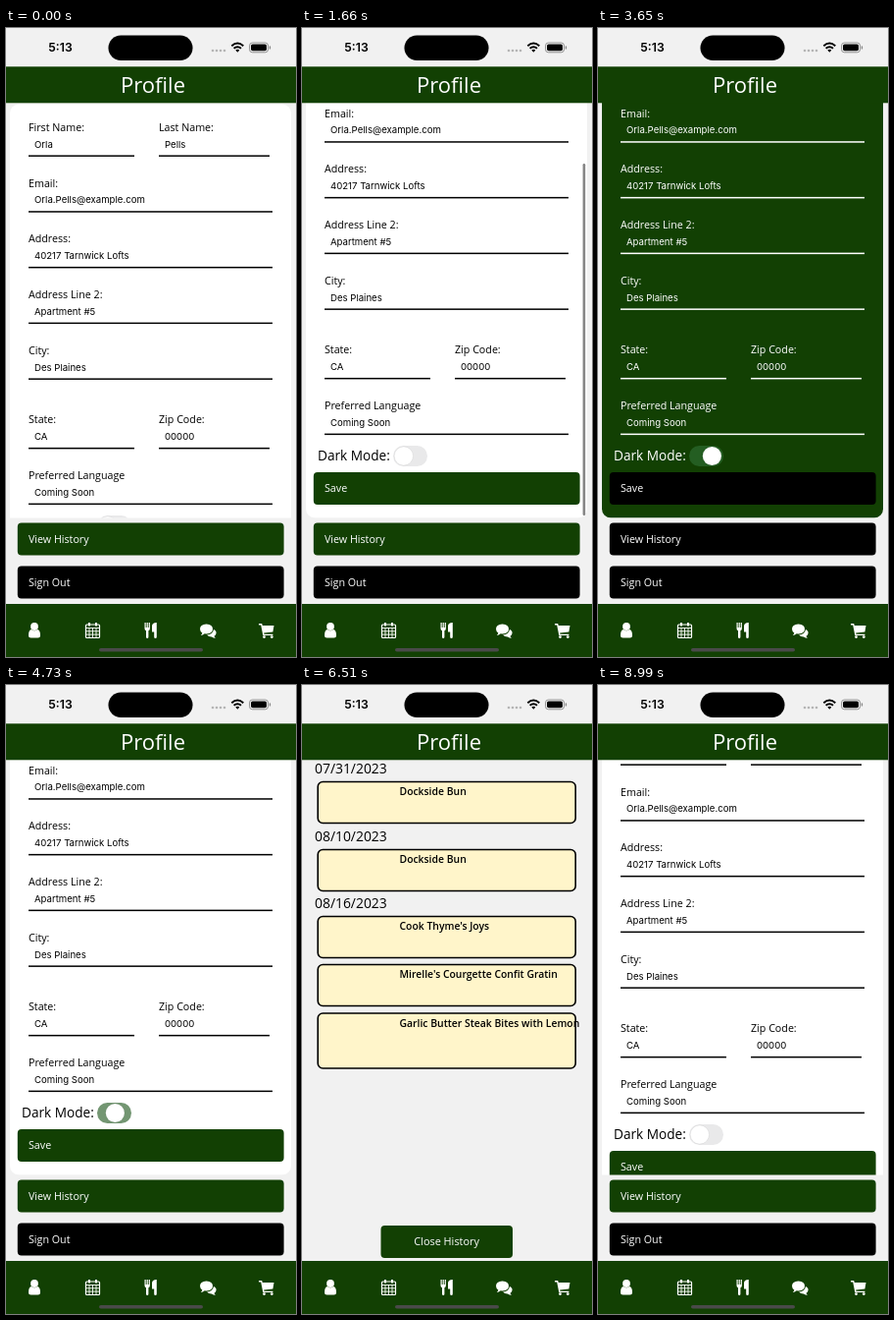
Animation, 296 px wide and 640 px high, one loop 9.76 s. Source, as an HTML page:

```html
<!DOCTYPE html>
<html lang="en">
<head>
<meta charset="utf-8">
<title>Profile</title>
<style>
  html, body { margin: 0; width: 100%; height: 100%; overflow: hidden; background: #f1f1f1; }
  svg { display: block; --card: #fff; --ink: #000; --btn: #124003; }
  svg.dark { --card: #124003; --ink: #fff; --btn: #000; }
  text { font-family: "Open Sans", sans-serif; }
  .val { font-family: Inter, sans-serif; }
  .ink { fill: var(--ink); }
  .card { fill: var(--card); }
  .btn { fill: var(--btn); }
  .green { fill: #124003; }
</style>
</head>
<body>
<script>
const LOOP = 9760;

const text = (x, y, s, size = 10.7, attr = 'class="ink"') =>
  `<text x="${x}" y="${y + size * 0.35}" font-size="${size}" ${attr}>${s}</text>`;
const rect = (x, y, w, h, r, attr) =>
  `<rect x="${x}" y="${y}" width="${w}" height="${h}" rx="${r}" ${attr}/>`;
const dot = (x, y, rx, fill, ry = rx) =>
  `<ellipse cx="${x}" cy="${y}" rx="${rx}" ry="${ry}" fill="${fill}"/>`;
const button = (y, label, attr = 'class="btn"') =>
  rect(11.8, y, 271.8, 33, 4, attr) + text(23, y + 16.5, label, 10.7, 'fill="#fff"');
const field = (x, y, w, label, value) =>
  text(x, y, label) + text(x + 6, y + 17.3, value, 9.6, 'class="ink val"') +
  rect(x, y + 28.4, w, 1.5, 0, 'class="ink"');

// Seeded scatter of small food pieces
function scatter(n, seed, cx, cy, rx, ry, size, colors) {
  const rnd = () => (seed = (seed * 16807) % 2147483647) / 2147483647;
  let out = '';
  for (let i = 0; i < n; i++) {
    const a = rnd() * 6.283, d = Math.sqrt(rnd());
    out += dot(cx + Math.cos(a) * d * rx, cy + Math.sin(a) * d * ry,
      size * (0.7 + rnd() * 0.6), colors[i % colors.length], size * 0.75);
  }
  return out;
}

function burger() {
  let rays = '';
  for (let i = 0; i < 12; i++) {
    rays += `<path d="M32 15L80 8V18Z" fill="#8fd0ea" opacity=".3" transform="rotate(${i * 30} 32 15)"/>`;
  }
  return rect(0, 0, 66, 30, 0, 'fill="url(#sky)"') + rays +
    rect(23, 21, 19, 5.5, 2.5, 'fill="#b9793a"') +
    rect(22.5, 17.5, 20, 4.5, 2, 'fill="#4a2a14"') +
    rect(22, 16, 21, 1.8, 0.9, 'fill="#d9a93c"') +
    rect(22, 14, 21, 2.2, 1, 'fill="#64803a"') +
    rect(24, 12.8, 17, 1.5, 0.7, 'fill="#a8432c"') +
    '<path d="M22.5 13Q23 4.500 32.500 4.500T42.500 13Z" fill="#b87d42"/>' +
    scatter(7, 5, 32, 8.5, 6, 2.5, 0.5, ['#ecd0a0']);
}

const bake = () => rect(0, 0, 66, 31, 0, 'fill="#d2cec8"') +
  dot(6, 5, 13, '#6d6a52', 8) + dot(60, 28, 10, '#a9a298', 6) +
  '<g transform="rotate(12 35 15)">' +
  dot(35, 15, 28, '#f4f1ec', 14.5) + dot(35, 14, 24, '#a33a1a', 11.5) +
  scatter(85, 11, 35, 14, 23, 11, 1.6, ['#c8381d', '#5f8c2b', '#e07f2a', '#9c2717', '#4b7424', '#e6b04a']) +
  '</g>';

function feast() {
  let out = rect(0, 0, 66, 30, 0, 'fill="#3d332c"');
  const plates = [[9, 7, 8, '#b8752f'], [30, 5, 8, '#7d8f3a'], [52, 8, 9, '#c9a05a'],
    [18, 21, 9, '#a84b28'], [40, 19, 9, '#c48a3c'], [60, 24, 8, '#8b4b2a']];
  plates.forEach(([x, y, r, c], i) => {
    out += dot(x, y, r, i % 2 ? '#d9d2c4' : '#7b8a8c') + dot(x, y, r - 1.8, c) +
      scatter(18, 21 + i, x, y, r - 2, r - 2, 1, ['#e0bd62', '#59702e', '#a5351f', '#4a3020']);
  });
  return out;
}

const steak = () => rect(0, 0, 66, 43, 0, 'fill="#cfcfcd"') +
  '<path d="M0 16L50 5L66 27L10 43Z" fill="#efefed"/>' +
  dot(38, 27, 26, '#e0deda', 14) + dot(14, 14, 6, '#7d9158', 3) +
  scatter(32, 7, 38, 26, 21, 9, 4.2, ['#4c3429', '#69493a', '#3d2a21', '#7b5a47']) +
  scatter(18, 9, 38, 25, 19, 8, 0.7, ['#8b9b58', '#a98468']);

const meals = [
  [98, 43, 'Dockside Bun', 30, burger],
  [167, 43, 'Dockside Bun', 30, burger],
  [235, 43, "Cook Thyme's Joys", 31, bake],
  [284, 43, "Mirelle's Courgette Confit Gratin", 30, feast],
  [333.5, 57, 'Garlic Butter Steak Bites with Lemon', 43, steak],
];

const history = meals.map(([y, h, name]) =>
    rect(16.2, y + 0.5, 263, h - 1, 5, 'fill="#fff5ca" stroke="#000" stroke-width="1.6"') +
    text(99.5, y + 10.7, name, 10.4, 'font-weight="600"')).join('') +
  [['07/31/2023', 85.6], ['08/10/2023', 153.8], ['08/16/2023', 222.2]]
    .map(([d, y]) => text(13, y, d, 13.9, '')).join('') +
  '<g id="thanks">' + meals.map(([y, h]) =>
    text(99.5, y + h - 14.3, 'Thanks for your previous review!', 10.6, '')).join('') + '</g>' +
  meals.map(([y, , , h, draw], i) =>
    `<clipPath id="c${i}">${rect(0, 0, 66, h, 5, '')}</clipPath>
     <g class="photo" transform="translate(23 ${y + 4.3})"><g clip-path="url(#c${i})">${draw()}</g></g>`).join('') +
  rect(80.5, 550, 134.5, 33, 4, 'class="green"') +
  text(147.6, 566.5, 'Close History', 10.9, 'fill="#fff" text-anchor="middle"');

const form = rect(4, 77.5, 287, 492, 9, 'class="card"') +
  field(23, 101, 108, 'First Name:', 'Orla') +
  field(156, 101, 113, 'Last Name:', 'Pells') +
  field(23, 157.8, 249, 'Email:', 'Orla.Pells@example.com') +
  field(23, 214.5, 249, 'Address:', '40217 Tarnwick Lofts') +
  field(23, 271.2, 249, 'Address Line 2:', 'Apartment #5') +
  field(23, 328, 249, 'City:', 'Des Plaines') +
  field(23, 398.5, 108, 'State:', 'CA') +
  field(156, 398.5, 113, 'Zip Code:', '00000') +
  field(23, 455.2, 249, 'Preferred Language', 'Coming Soon') +
  text(16, 506.5, 'Dark Mode:', 13.6) +
  rect(93, 496, 35, 21, 10.5, 'id="track"') +
  '<circle id="knob" cy="506.5" r="9.6" fill="#fff" stroke="#000" stroke-opacity=".1" stroke-width=".6"/>' +
  button(523, 'Save');

const status = text(55.5, 20, '5:13', 12.3, 'class="val" font-weight="600" text-anchor="middle"') +
  rect(104.5, 7.6, 86, 25.4, 12.7, '') +
  [211, 215, 219, 223].map(x => dot(x, 23, 1.3, '#b5b5b5')).join('') +
  `<g fill="none" stroke="#000" stroke-width="1.9">
     <path d="M230.3 18.2Q236.3 12.9 242.3 18.2M232.6 20.8Q236.3 17.6 240 20.8"/></g>
   <path d="M234.3 22.6Q236.3 21 238.3 22.6L236.3 24.8Z"/>` +
  rect(248.5, 15, 19, 9.8, 3, 'fill="none" stroke="#888" stroke-width=".9"') +
  rect(250, 16.5, 16, 6.8, 1.7, '') + rect(268.8, 18.3, 1.3, 3.2, 0.6, 'fill="#888"');

const tabs = rect(0, 586, 296, 54, 0, 'class="green"') + `
  <g fill="#fff">
    <circle cx="29" cy="609" r="3.9"/>
    <path d="M23 618Q23 612.5 26 612Q29 614.5 32 612Q35 612.5 35 618Q35 620.5 32.5 620.5H25.5Q23 620.5 23 618Z"/>
    <path d="M141.500 605h1.200v5h.9v-5h1.200v5h.9v-5h1.200v6q0 1.800-1.500 2.300v6.200q0 1.500-1.200 1.500t-1.200-1.500v-6.200q-1.500-.5-1.500-2.300z"/>
    <path d="M149 608.5Q149 605 153.8 605V619.5Q153.8 621 152.5 621T151.2 619.5V614.5H149Z"/>
    <path d="M205 617.5Q211 617 212 612Q215 613.5 214.5 616Q214 618 212.5 618.7Q213 620 214 620.8Q211.5 620.8 210 619.4Q207 619.5 205 617.5Z"/>
    <path d="M204.5 606.5Q211 607 211 611.5T204.5 616.4Q203.5 616.4 202.7 616.3Q201 617.9 198.8 618Q200 616.8 200.3 615.4Q198 614 198 611.5Q198 607 204.5 606.5Z"/>
    <path d="M258 606h3.2l.6 2H273.5l-1.1 6.5-9.2 1.1.3 1.1h8.9v1.3H262.3L260.2 607.4H258Z"/>
    <circle cx="263.5" cy="619.6" r="1.4"/><circle cx="271.3" cy="619.6" r="1.4"/>
  </g>
  <g fill="none" stroke="#fff">
    <rect x="81.5" y="607" width="14" height="13.5" rx="1" stroke-width="1.2"/>
    <path d="M81.5 610.5H95.5M81.5 613.8H95.5M81.5 617.1H95.5M85 610.5V620.5M88.5 610.5V620.5M92 610.5V620.5" stroke-width=".9"/>
    <path d="M85 605V608.5M92 605V608.5" stroke-width="2"/>
  </g>` + rect(95, 631, 106, 3.6, 1.8, 'fill="#4a4a4a"');

document.body.innerHTML = `<svg width="296" height="640" viewBox="0 0 296 640">
  <radialGradient id="sky"><stop offset="0" stop-color="#86cde8"/><stop offset="1" stop-color="#1f7db4"/></radialGradient>
  <clipPath id="view"><rect id="port" y="76" width="296"/></clipPath>
  ${rect(0, 0, 296, 640, 0, 'fill="#f1f1f1"')}
  <g id="profile">
    <g clip-path="url(#view)"><g id="form">${form}</g>
      ${rect(286.6, 78, 2.6, 358, 1.3, 'id="bar" fill="#858585"')}</g>
    <g id="open">${button(503.6, 'View History')}</g>
    ${text(147.6, 531, 'Orders are loading...', 10.7, 'id="loading" text-anchor="middle"')}
    ${button(547.4, 'Sign Out', '')}
  </g>
  <g id="history">${history}</g>
  ${status}
  ${rect(0, 39.3, 296, 37, 0, 'class="green"')}
  ${text(150, 58, 'Profile', 22, 'fill="#fff" font-weight="500" text-anchor="middle"')}
  ${tabs}
</svg>`;

const $ = id => document.getElementById(id);
const svg = document.querySelector('svg');
const photos = document.querySelectorAll('.photo');
const show = (el, on) => el.setAttribute('display', on ? 'inline' : 'none');
const held = (t, steps) => steps.filter(s => s[0] <= t).pop()[1];
const mix = (a, b, p) => a + (b - a) * p;
const ease = (t, a, b) => {
  const p = Math.min(1, Math.max(0, (t - a) / (b - a)));
  return p * p * (3 - 2 * p);
};

function draw(t) {
  const scroll = held(t, [[0, 0], [1450, 3.5], [1550, 42], [1660, 71], [5990, 49]]);
  const on = ease(t, 3500, 3650) - ease(t, 4640, 4850);
  const loading = t >= 5990 && t < 6510;
  const past = t >= 6510 && t < 8990;

  svg.classList.toggle('dark', t >= 3550 && t < 4730);
  $('form').setAttribute('transform', `translate(0 ${-scroll})`);
  $('port').setAttribute('height', loading ? 448 : 422.5);
  $('bar').setAttribute('y', 78 + scroll * 0.845);
  $('bar').setAttribute('opacity', held(t, [[0, 0], [1450, 1], [2970, 0.5], [3090, 0]]));
  $('knob').setAttribute('cx', mix(103.8, 116.4, on));
  $('track').setAttribute('fill', `rgb(${mix(233, 36, on)},${mix(233, 94, on)},${mix(234, 34, on)})`);

  show($('profile'), !past);
  show($('history'), past);
  show($('open'), !loading);
  show($('loading'), loading);
  show($('thanks'), t >= 6980);
  photos.forEach((p, i) => show(p, t >= (i ? 7270 : 7450)));
}

function tick() {
  draw(performance.now() % LOOP);
  requestAnimationFrame(tick);
}
tick();
</script>
</body>
</html>
```
